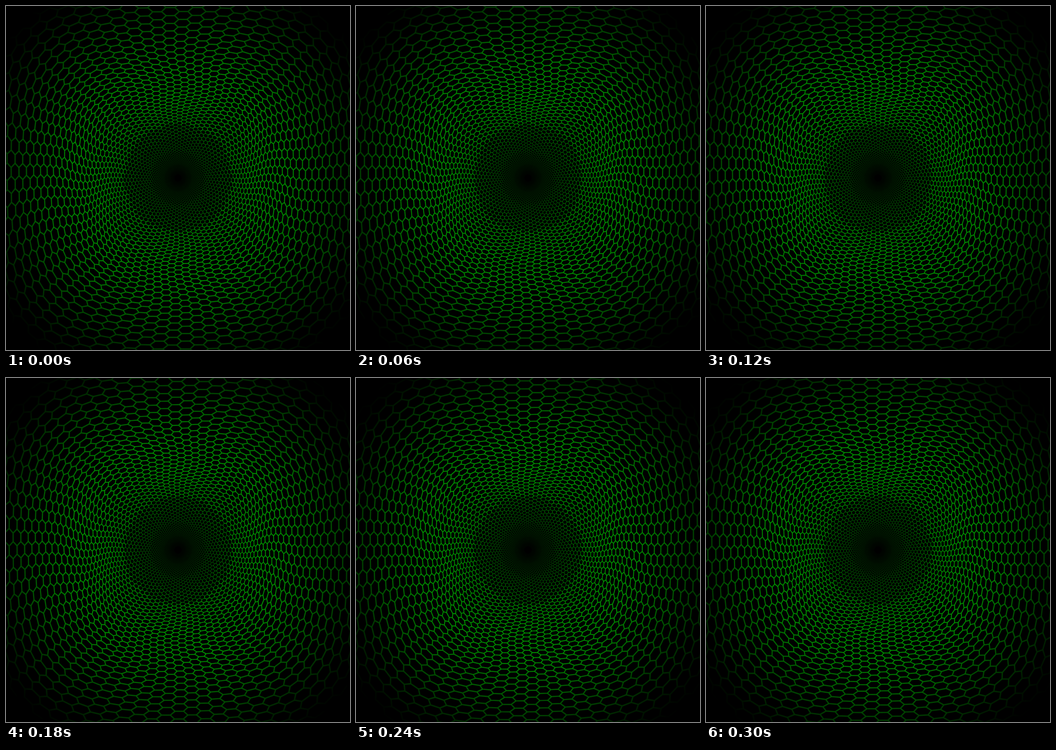
Write an HTML page with a canvas that moves like this. It is 748x748 px and loops after 360 ms.

```html
<!DOCTYPE html>
<html lang="en">
<head>
<meta charset="utf-8">
<title>Hexagon tunnel</title>
<style>
html, body { margin: 0; width: 100%; height: 100%; overflow: hidden; background: #000; }
canvas { display: block; width: 748px; height: 748px; }
</style>
</head>
<body>
<canvas id="stage" width="748" height="748"></canvas>
<script>
const SIZE = 748, MID = SIZE / 2, REACH = 480;
const COLS = 80, LOOP = 360, STEPS = 6;
const TURN = 2 * Math.PI / COLS;
const ROW = TURN * 2 / Math.sqrt(3);
const START = -Math.PI / 2 + 0.45 * TURN;
const ctx = document.getElementById('stage').getContext('2d');

const glow = ctx.createRadialGradient(MID, MID, 0, MID, MID, REACH);
[[0, 0], [.03, 10], [.08, 60], [.14, 115], [.22, 155], [.36, 172], [.48, 158],
 [.6, 122], [.72, 84], [.8, 56], [.88, 28], [.95, 8], [1, 0]]
  .forEach(([at, g]) => glow.addColorStop(at, `rgb(0,${g},0)`));

const ramp = (x, w) => w * Math.log(1 + Math.exp(x / w));
const bump = (x, mid, w) => Math.exp(-(((x - mid) / w) ** 2));

// Ring number at log-radius x: a log-polar lattice, denser outside, with four lobes.
function ringAt(x, a) {
  const squeeze = 0.85 + 0.1 * Math.cos(4 * a);
  const lobes = 0.06 * Math.cos(4 * a + 0.3) + 0.03 * Math.cos(3 * a - 1.5);
  return (x + squeeze * ramp(x - 0.22, 0.15) + lobes * bump(x, 0.72, 0.38)) / ROW;
}

// The columns sway sideways around the middle of the tunnel wall.
const sway = (x, a) => 0.04 * Math.sin(7 * x + 2 * a) * bump(x, 0.72, 0.4);

function project(u, v) {
  const a = START + u * TURN;
  let lo = -3, hi = 2;
  for (let i = 0; i < 16; i++) {
    const x = (lo + hi) / 2;
    if (ringAt(x, a) < v) lo = x; else hi = x;
  }
  const x = (lo + hi) / 2, r = 100 * Math.exp(x), b = a + sway(x, a);
  return { x: MID + r * Math.cos(b), y: MID + r * Math.sin(b), r };
}

const topRing = ringAt(Math.log(3.62), -Math.PI / 2);
const phase = (topRing - 0.5) % 1;
const FIRST = -29, LAST = 40;
const CORNERS = [[-1 / 3, .5], [1 / 3, .5], [2 / 3, 0], [1 / 3, -.5]];
const BAND = 30, BANDS = REACH / BAND;

// Each cell owns three edges; paths are grouped by radius to set the line width.
function buildFrame(p) {
  const bands = Array.from({ length: BANDS }, () => new Path2D());
  for (let j = 0; j < COLS; j++) {
    for (let i = FIRST; i < LAST; i++) {
      const u = j - p, v = i + (j & 1) / 2 + p / 2 + phase;
      const pts = CORNERS.map(([du, dv]) => project(u + du, v + dv));
      const r = pts[1].r;
      if (r >= REACH) break;
      const path = bands[Math.floor(r / BAND)];
      path.moveTo(pts[0].x, pts[0].y);
      for (const q of pts.slice(1)) path.lineTo(q.x, q.y);
    }
  }
  return bands;
}

const frames = Array.from({ length: STEPS }, (_, k) => buildFrame(k / STEPS));

function stroke(path, width, alpha) {
  ctx.lineWidth = width;
  ctx.globalAlpha = alpha;
  ctx.stroke(path);
}

function draw(k) {
  ctx.globalAlpha = 1;
  ctx.fillStyle = '#000';
  ctx.fillRect(0, 0, SIZE, SIZE);
  ctx.strokeStyle = glow;
  ctx.lineJoin = 'round';
  frames[k].forEach((path, b) => {
    const w = 0.6 + 0.13 * b;
    if (b > 3) stroke(path, w * 1.8, 0.3);
    stroke(path, w, 0.9);
  });
}

let shown = 0;
function tick(now) {
  const k = Math.floor((now % LOOP) / LOOP * STEPS);
  if (k !== shown) draw(shown = k);
  requestAnimationFrame(tick);
}
draw(shown);
requestAnimationFrame(tick);
</script>
</body>
</html>
```
